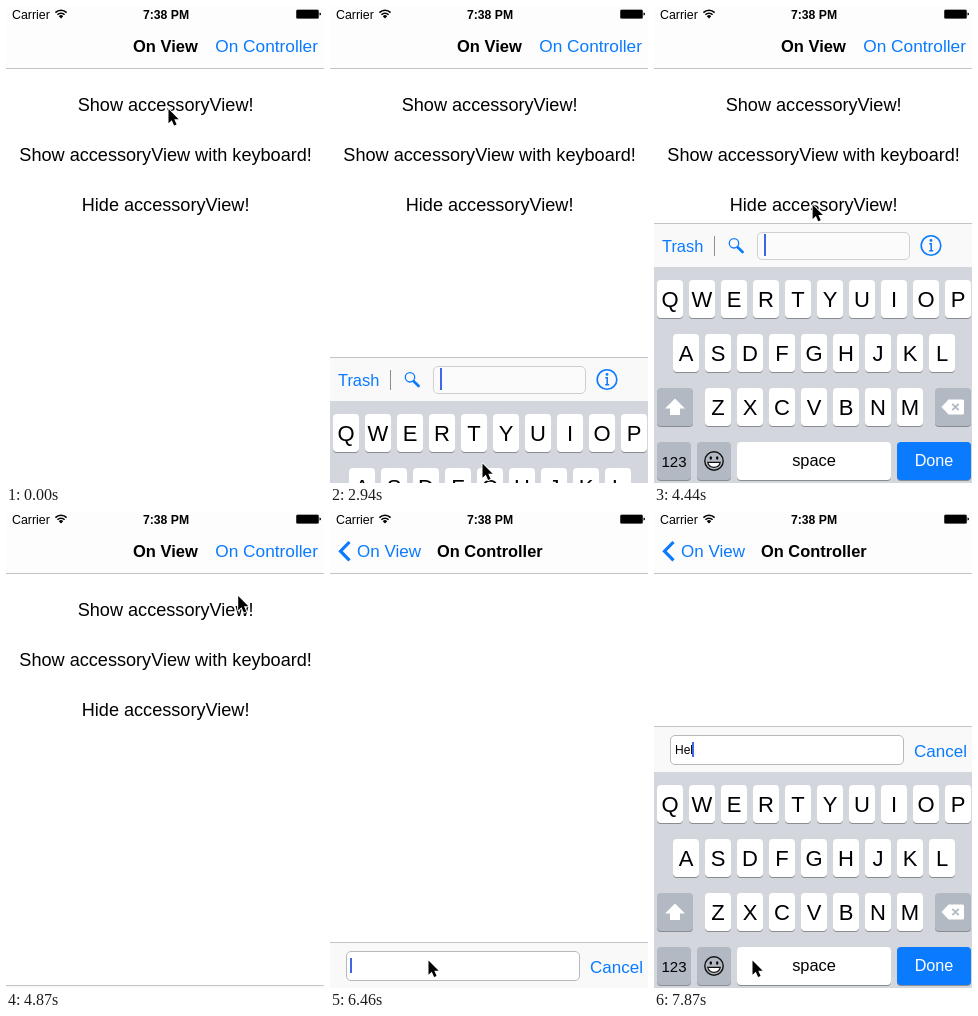
An HTML page that plays this animation: 318 by 477 pixels, repeating every 8 s.

```html
<!DOCTYPE html>
<html lang="en">
<head>
<meta charset="utf-8">
<title>Accessory view demo</title>
<style>
  html, body { margin: 0; width: 100%; height: 100%; overflow: hidden; background: #fff; }
  svg { display: block; width: 100%; height: 100%; font-family: "Liberation Sans", Arial, sans-serif; }
  text { white-space: pre; }
</style>
</head>
<body>
<svg id="stage" viewBox="0 0 318 477"></svg>
<script>
const LOOP = 8000;
const BLUE = '#0a7aff', CARET = '#3f66e8', LINE = '#c4c4c6', GREY_KEY = '#b2b9c3';

// ---- markup helpers ----
const text = (s, x, y, size, opt = '') =>
  `<text x="${x}" y="${y}" font-size="${size}" ${opt}>${s}</text>`;
const rect = (x, y, w, h, fill, opt = '') =>
  `<rect x="${x}" y="${y}" width="${w}" height="${h}" fill="${fill}" ${opt}/>`;
const path = (d, opt) => `<path d="${d}" ${opt}/>`;
const group = (id, body) => `<g id="${id}">${body}</g>`;
const MID = 'text-anchor="middle"';

const key = (x, y, w, fill, body = '') =>
  rect(x, y + 1, w, 38, '#898c91', 'rx="4"') + rect(x, y, w, 38, fill, 'rx="4"') + body;

const letterRow = (letters, x0, y) => [...letters].map((c, i) => {
  const x = x0 + i * 32;
  return key(x, y, 26, '#fff', text(c, x + 13, y + 27, 22, MID));
}).join('');

const bar = (id, h, body) =>
  group(id, rect(0, 0, 318, h, '#f9f9f9') + rect(0, 0, 318, 1, LINE) + body);

const field = (x, y, w, h, stroke, fill) =>
  rect(x + .5, y + .5, w - 1, h - 1, fill, `rx="4.5" stroke="${stroke}"`);

// ---- parts ----
const statusBar =
  text('Carrier', 6, 12.5, 12.4) +
  path('M49.4 6.6a8 8 0 0 1 11.2 0M51.4 8.7a5.1 5.1 0 0 1 7.2 0', 'fill="none" stroke="#000" stroke-width="1.6"') +
  path('M55 12.6l-2.2-2.4a3.1 3.1 0 0 1 4.4 0z', '') +
  text('7:38 PM', 160, 12.5, 12.2, MID + ' font-weight="700"') +
  rect(290, 3.5, 23, 9.2, '#555', 'rx="1.5"') +
  rect(290.7, 4, 21.6, 8.2, '#000', 'rx="1"') +
  path('M313.5 6.4q1.6 .2 1.6 1.6t-1.6 1.6z', '');

const nav =
  rect(0, 0, 318, 62, '#fdfdfd') + rect(0, 62, 318, 1, LINE) + statusBar +
  text('On View', 0, 46, 16.5, 'id="title1" font-weight="700"') +
  text('On Controller', 209.2, 46, 17.3, `id="next" fill="${BLUE}"`) +
  path('M19.5 31L10.5 40.2L19.5 49.4', `id="chevron" fill="none" stroke="${BLUE}" stroke-width="3.2"`) +
  text('On View', 0, 46, 17, `id="back" fill="${BLUE}"`) +
  text('On Controller', 0, 46, 16.4, 'id="title2" font-weight="700"');

const toolbar = bar('bar1', 44,
  text('Trash', 8, 29, 16.4, `fill="${BLUE}"`) +
  rect(60, 13, 1, 20, '#8e8e93') +
  `<circle cx="80" cy="20.3" r="4.7" fill="none" stroke="${BLUE}" stroke-width="1.3"/>` +
  path('M83.7 24.2L88.6 29', `stroke="${BLUE}" stroke-width="2.6" stroke-linecap="round"`) +
  field(103, 9, 153, 28, '#d0d0d2', '#fbfbfb') +
  rect(110, 11, 2, 22, CARET, 'id="caret1"') +
  `<circle cx="277" cy="22.5" r="9.8" fill="none" stroke="${BLUE}" stroke-width="1.6"/>` +
  `<circle cx="277" cy="17.4" r="1.4" fill="${BLUE}"/>` +
  path('M275.3 20.8H277.2V27.8M275.2 27.7H279.2', `fill="none" stroke="${BLUE}" stroke-width="1.5"`));

const inputBar = bar('bar2', 46,
  field(16, 9, 234, 30, '#b9b9bb', '#fff') +
  text('', 21, 28, 12, 'id="typed"') +
  rect(0, 16, 2, 15, CARET, 'id="caret2"') +
  text('Cancel', 260, 31, 17, `fill="${BLUE}"`));

const page1 = group('page1',
  rect(0, 0, 318, 477, '#fff') +
  ['Show accessoryView!', 'Show accessoryView with keyboard!', 'Hide accessoryView!']
    .map((s, i) => text(s, 159.6, 105 + i * 50, 18.12, MID)).join('') +
  toolbar);

const smiley =
  '<circle cx="60" cy="194" r="9.2" fill="none" stroke="#111" stroke-width="1.4"/>' +
  '<ellipse cx="56.8" cy="191" rx="1.2" ry="1.8"/><ellipse cx="63.2" cy="191" rx="1.2" ry="1.8"/>' +
  path('M53.8 195.4H66.2A6.3 6 0 0 1 53.8 195.4Z', 'fill="#fff" stroke="#111" stroke-width="1.2"');

const keyboard = group('keyboard',
  rect(0, 0, 318, 218, '#d3d7dd') +
  letterRow('QWERTYUIOP', 3, 13) +
  letterRow('ASDFGHJKL', 19, 67) +
  letterRow('ZXCVBNM', 51, 121) +
  key(3, 121, 36, GREY_KEY, path('M21 131.5L31 141.5H26V148H16V141.5H11Z', 'fill="#fff"')) +
  key(281, 121, 36, GREY_KEY,
    path('M287.5 140L294.5 132.5H308.5Q310 132.5 310 134V146Q310 147.5 308.5 147.5H294.5Z', 'fill="#fff"') +
    path('M298.3 136.8L304.7 143.2M304.7 136.8L298.3 143.2', `stroke="${GREY_KEY}" stroke-width="1.8"`)) +
  key(3, 175, 34, GREY_KEY, text('123', 20, 200, 15, MID)) +
  key(43, 175, 34, GREY_KEY, smiley) +
  key(83, 175, 154, '#fff', text('space', 160, 198.5, 16.4, MID)) +
  key(243, 175, 74, BLUE, text('Done', 280, 199, 16.2, MID + ' fill="#fff"')));

const pointer = path('M.5 .6v14.2l3.3-3l2.3 5.3l2.5-1.1l-2.3-5.2h4.4z',
  'id="pointer" stroke="#fff" stroke-width="1.8" paint-order="stroke" stroke-linejoin="round"');

document.getElementById('stage').innerHTML =
  page1 + rect(0, 0, 318, 477, '#000', 'id="dim"') +
  group('page2', rect(0, 0, 318, 477, '#fff') + inputBar) +
  nav + keyboard + pointer;

const el = {};
document.querySelectorAll('[id]').forEach(n => el[n.id] = n);

// ---- timing ----
// Bursts of motion, each redrawn in even steps: start, end, number of steps.
const BURSTS = [
  [990, 1780, 10], [1870, 2490, 8], [2940, 3740, 10], [3820, 4000, 3], [4440, 5210, 10],
  [5390, 6110, 9], [6200, 6200, 1], [6460, 7160, 9], [7430, 7430, 1], [7700, 7700, 1], [7870, 7870, 1]
];

function stepTime(t) {
  let shown = 0;
  for (const [a, b, n] of BURSTS) {
    if (t < a) break;
    const gap = n > 1 ? (b - a) / (n - 1) : 1;
    shown = Math.min(b, a + Math.floor((t - a) / gap + 1e-6) * gap);
  }
  return shown;
}

// Critically damped spring from 0 to 1.
function spring(t, start, speed = 18) {
  const w = Math.max(0, t - start) / 1000 * speed;
  return 1 - (1 + w) * Math.exp(-w);
}

const mix = (a, b, p) => a + (b - a) * p;

// Pointer path: time, x, y.
const TRACK = [
  [0, 162, 102.5], [1430, 162, 102.5], [2490, 152, 457], [2960, 152, 457], [3300, 149, 336],
  [3740, 110, 232], [4000, 157, 200], [4400, 157, 200], [4870, 232, 84], [5210, 262, 40],
  [5440, 262, 40], [6170, 98, 449], [LOOP, 98, 449]
];

function slope(i, axis) {
  const a = TRACK[i - 1], b = TRACK[i], c = TRACK[i + 1];
  if (!a || !c || (b[axis] - a[axis]) * (c[axis] - b[axis]) <= 0) return 0;
  return (c[axis] - a[axis]) / (c[0] - a[0]);
}

function track(t, axis) {
  let i = 0;
  while (i < TRACK.length - 2 && t >= TRACK[i + 1][0]) i++;
  const a = TRACK[i], b = TRACK[i + 1], d = b[0] - a[0], p = (t - a[0]) / d;
  const s = p * p * (3 - 2 * p);
  return mix(a[axis], b[axis], s) +
    d * (slope(i, axis) * p * (1 - p) ** 2 - slope(i + 1, axis) * p * p * (1 - p));
}

const move = (node, x, y) => node.setAttribute('transform', `translate(${x.toFixed(2)} ${y.toFixed(2)})`);
const fade = (node, a) => node.setAttribute('opacity', a.toFixed(3));

function draw(now) {
  const t = stepTime(now);

  const bar1 = 477 - 44 * spring(t, 940) - 216 * spring(t, 2867) + 261 * spring(t, 4520);
  const bar2 = 431 - 216 * spring(t, 6470);
  const push = spring(t, 5350, 13);
  const onPage2 = t >= 5350;

  move(el.page1, -95 * push, 0);
  move(el.page2, 318 * (1 - push), 0);
  fade(el.dim, onPage2 ? .1 * push : 0);
  move(el.bar1, 0, Math.round(bar1));
  move(el.bar2, 0, Math.round(bar2));
  move(el.keyboard, 0, Math.round(onPage2 ? bar2 + 46 : bar1 + 44));
  fade(el.caret1, t >= 2867 ? 1 : 0);

  const titleX = mix(127, 27, push);
  move(el.title1, titleX, 0);
  move(el.back, titleX, 0);
  move(el.title2, mix(318, 107, push), 0);
  fade(el.title1, 1 - push);
  fade(el.next, 1 - push);
  for (const n of [el.back, el.chevron, el.title2]) fade(n, push);

  const count = [7430, 7700, 7870].filter(k => t >= k).length;
  el.typed.textContent = 'Hel'.slice(0, count);
  el.caret2.setAttribute('x', 20 + (count ? el.typed.getComputedTextLength() : 0));
  fade(el.caret2, t >= 6460 ? 1 : 0);

  move(el.pointer, track(t, 1), track(t, 2));
}

const begin = performance.now();
function tick() {
  draw((performance.now() - begin) % LOOP);
  requestAnimationFrame(tick);
}
tick();
</script>
</body>
</html>
```
